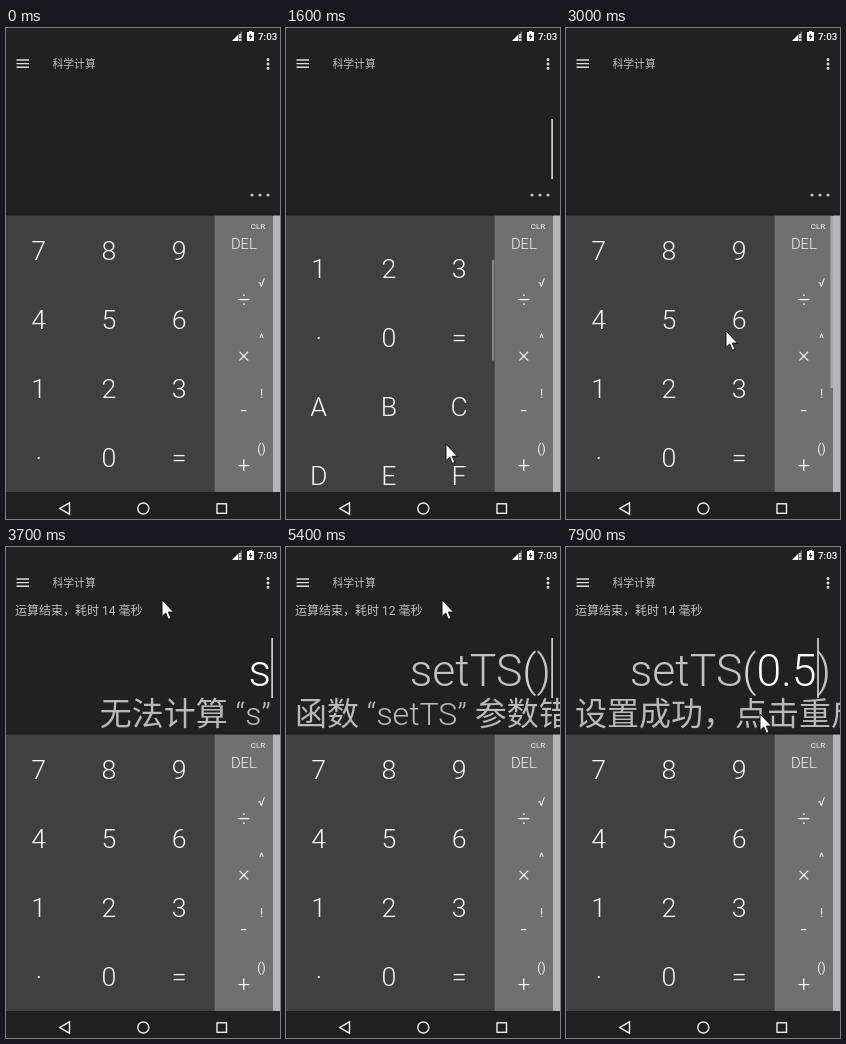
An HTML page for the animation above (8 s loop, 274 px wide and 491 px high).

```html
<!DOCTYPE html>
<html lang="zh-CN">
<head>
<meta charset="utf-8">
<style>
html, body { margin: 0; width: 100%; height: 100%; overflow: hidden; background: #212121; }
svg { display: block; width: 274px; height: 491px; }
text { font-family: Roboto, "Noto Sans CJK TC", "Noto Sans CJK SC", "Noto Sans CJK", sans-serif; font-weight: 300; fill: #f4f4f4; white-space: pre; }
.key { font-size: 26.7px; text-anchor: middle; }
.ring { font-family: "Noto Sans", sans-serif; font-size: 16.5px; font-weight: 500; text-anchor: middle; }
.alt { font-weight: 400; text-anchor: middle; }
.cn { font-weight: 400; fill: #bdbdbd; }
#entry { font-size: 44.5px; text-anchor: end; }
#result { font-size: 32px; fill: #b9b9b9; }
</style>
</head>
<body>
<svg viewBox="0 0 274 491">
  <defs>
    <clipPath id="mainClip"><rect y="188" width="208.5" height="276"/></clipPath>
    <clipPath id="sideClip"><rect x="208" y="188" width="59" height="276"/></clipPath>
    <linearGradient id="shade" x2="0" y2="1">
      <stop stop-color="#000" stop-opacity="0"/><stop offset="1" stop-color="#000" stop-opacity=".3"/>
    </linearGradient>
  </defs>
  <rect width="274" height="491" fill="#212121"/>

  <path d="M226 13H236V3Z" fill="#777"/><path d="M226 13H232V7Z" fill="#fff"/>
  <path d="M234 6V10M234 11V13" stroke="#fff" stroke-width="1.2"/>
  <path d="M241 4H243V3H246V4H248V13H241Z" fill="#fff"/>
  <path d="M245 5L242.6 9H244.3L243.8 12L246.5 8H244.7Z" fill="#212121"/>
  <text x="271.3" y="12" text-anchor="end" style="font-size:9.8px;font-weight:500;fill:#fff">7:03</text>
  <path d="M10.5 32H23M10.5 35.6H23M10.5 39.2H23" stroke="#ddd" stroke-width="1.4"/>
  <text class="cn" x="46.5" y="39.5" style="font-size:10.8px">科学计算</text>
  <path d="M262 31.6V40.3" stroke="#ddd" stroke-width="3" stroke-linecap="round" stroke-dasharray="0 4.3"/>

  <text class="cn" id="status" x="9" y="68" style="font-size:12px"></text>
  <path id="dots" d="M246 167H262.1" stroke="#c4c4c4" stroke-width="3.2" stroke-linecap="round" stroke-dasharray="0 8"/>
  <text id="entry" x="265" y="139"></text>
  <rect id="caret" y="91" width="1.6" height="60" fill="#d8d8d8"/>
  <text id="result" y="177.5"></text>

  <rect y="184" width="274" height="4" fill="url(#shade)"/>
  <rect y="187.5" width="208.5" height="276.5" fill="#404040"/>
  <rect x="208.5" y="187.5" width="58.5" height="276.5" fill="#707070"/>
  <rect x="267" y="187.5" width="7" height="276.5" fill="#b5b5b5"/>
  <g clip-path="url(#mainClip)">
    <ellipse id="glowTop" cx="104" cy="188" rx="165" fill="#383838"/>
    <ellipse id="glowEnd" cx="104" cy="464" rx="135" fill="#383838"/>
    <g id="main"></g>
    <rect id="mainBar" x="206" width="2.5" height="100.5" fill="#858585"/>
  </g>
  <g clip-path="url(#sideClip)">
    <g id="side"></g>
    <rect id="sideBar" x="264.4" width="2.6" height="172" fill="#a8a8a8"/>
  </g>

  <rect y="464" width="274" height="27" fill="#202020"/>
  <g fill="none" stroke="#eee" stroke-width="1.4">
    <path d="M63.5 474.8V486.2L53.8 480.5Z"/><circle cx="137.3" cy="480.5" r="5.5"/><rect x="211" y="475.8" width="9.5" height="9.5"/>
  </g>
  <path id="mouse" d="M0 0V16.5L3.7 13L6.4 19.3L9 18.2L6.3 12.1H11.6Z" fill="#fff" stroke="#111" stroke-width="1"/>
</svg>
<script>
const LOOP = 8000, STEP = 100;
const ROW = 69, MAIN_MAX = 7 * ROW, SIDE_ROW = 55.25, SIDE_MAX = 169;
const $ = id => document.getElementById(id);
const set = (id, name, value) => $(id).setAttribute(name, value);

function add(parent, tag, attrs, str = "") {
  const el = document.createElementNS("http://www.w3.org/2000/svg", tag);
  for (const name in attrs) el.setAttribute(name, attrs[name]);
  el.textContent = str;
  parent.append(el);
}

// Number pad: digits, hex letters, then bracketed bases 2 to 16
const keys = [..."789456123·0=ABCDEF"];
for (let n = 2; n <= 16; n++) keys.push(n);
keys.forEach((key, i) => {
  const x = 32.7 + 70.2 * (i % 3), y = 223 + ROW * Math.floor(i / 3);
  if (typeof key === "string") {
    add($("main"), "text", { x, y: y + 9.3, class: "key" }, key);
  } else {
    add($("main"), "text", { x, y: y + 6, class: "ring", "letter-spacing": key > 9 ? -1.7 : 0 }, key);
    add($("main"), "path", {
      d: `M${x - 7} ${y - 10.5}q-8 10.5 0 21M${x + 7} ${y - 10.5}q8 10.5 0 21`,
      fill: "none", stroke: "#f0f0f0", "stroke-width": 1.5
    });
  }
});

const ops = ["DEL", "÷", "×", "-", "+", "%", ",", "i"];
const alts = ["CLR", "√", "^", "!", "()", "°", "∞", "x"];
ops.forEach((op, i) => {
  const y = 216 + SIDE_ROW * i, wide = i === 0;
  const size = wide ? 14.7 : 22.5;
  add($("side"), "text", { x: 237.8, y: y + size * 0.35, class: "key", style: `font-size:${size}px` }, op);
  add($("side"), "text", {
    x: wide ? 252 : 255.5, y: y - (wide ? 15 : 12), class: "alt", style: `font-size:${wide ? 8 : 12}px`
  }, alts[i]);
});

// time, typed text, milliseconds reported
const typing = [[3700, "s", 14], [3900, "se", 8], [4100, "set", 7], [4500, "setT", 6], [4600, "setTS", 10],
  [5300, "setTS()", 12], [6300, "setTS(0)", 15], [6600, "setTS(0.)", 9], [7000, "setTS(0.5)", 14]];
const taps = [-500, 3300, 5900, 7900];
const touches = [...taps, ...typing.map(row => row[0])];
const mousePath = [[0, 160, 440], [1000, 160, 333], [1700, 160, 430], [1900, 254, 420], [2100, 254, 321],
  [2700, 254, 424], [3000, 160, 303], [3300, 156, 53], [7200, 156, 53], [7700, 194, 167]];

const clamp = v => Math.min(1, Math.max(0, v));
const ease = (t, from, to) => (1 - Math.cos(Math.PI * clamp((t - from) / (to - from)))) / 2;
const bump = (t, from, to) => Math.sin(Math.PI * clamp((t - from) / (to - from)));

function mouseAt(t) {
  const i = mousePath.findIndex(p => p[0] > t);
  if (i < 0) return mousePath.at(-1).slice(1);
  const a = mousePath[i - 1], b = mousePath[i], k = (t - a[0]) / (b[0] - a[0]);
  return [1, 2].map(n => a[n] + (b[n] - a[n]) * k);
}

function answer(text) {
  const [, name, arg] = text.match(/^(\w*)(?:\((.*)\))?$/);
  if (arg === undefined) return `无法计算 “${name}”`;
  if (arg === "") return `函数 “${name}” 参数错误`;
  return Number(arg) ? "设置成功，点击重启生效" : "缩放比例应在 0.5 到 5 之间";
}

function drawText(t) {
  const [, text, ms] = typing.filter(row => row[0] <= t).pop() || [0, "", 0];
  const message = text && answer(text);
  $("entry").replaceChildren();
  for (const part of text.match(/setTS|[()]|[^()]+/g) || []) {
    const fill = part === "setTS" || part === ")" ? "#c2c2c2" : part === "(" ? "#d0d0d0" : "#fafafa";
    add($("entry"), "tspan", { style: `fill:${fill}` }, part);
  }
  $("result").replaceChildren();
  for (const part of message.match(/[\u3000-\uffff]+|[^\u3000-\uffff]+/g) || []) {
    add($("result"), "tspan", { "font-weight": part > "\u3000" ? 500 : 300 }, part);
  }
  set("result", "x", Math.max(9, 265 - (message ? $("result").getComputedTextLength() : 0)));
  $("status").textContent = message && `运算结束，耗时 ${ms} 毫秒`;
  $("dots").style.display = message ? "none" : "";

  const idle = t - Math.max(...touches.filter(time => time <= t));
  set("caret", "x", t < 5900 ? 265.3 : 251.2);
  $("caret").style.display = idle % 1000 < 500 ? "" : "none";
}

function drawPads(t) {
  const main = ease(t, 0, 900) - ease(t, 1000, 1900);
  const side = ease(t, 1900, 2100) - ease(t, 2200, 2700);
  set("main", "transform", `translate(0 ${-MAIN_MAX * main})`);
  set("side", "transform", `translate(0 ${-SIDE_MAX * side})`);
  set("mainBar", "y", 188 + 175.5 * main);
  set("sideBar", "y", 188 + 104 * side);
  set("mainBar", "opacity", ease(t, 0, 100) - ease(t, 2100, 2500));
  set("sideBar", "opacity", ease(t, 1800, 1900) - ease(t, 3000, 3300));
  set("glowTop", "ry", 16 * bump(t, 1800, 2400));
  set("glowEnd", "ry", 29 * bump(t, 800, 1200));
}

function draw(t) {
  drawText(t);
  drawPads(t);
  set("mouse", "transform", `translate(${mouseAt(t)})`);
  $("mouse").style.display = t < 100 ? "none" : "";
}

const start = performance.now();
let shown = -1;
function tick() {
  const t = Math.floor(Math.max(0, performance.now() - start) % LOOP / STEP) * STEP;
  if (t !== shown) draw(shown = t);
  requestAnimationFrame(tick);
}
tick();
</script>
</body>
</html>
```
